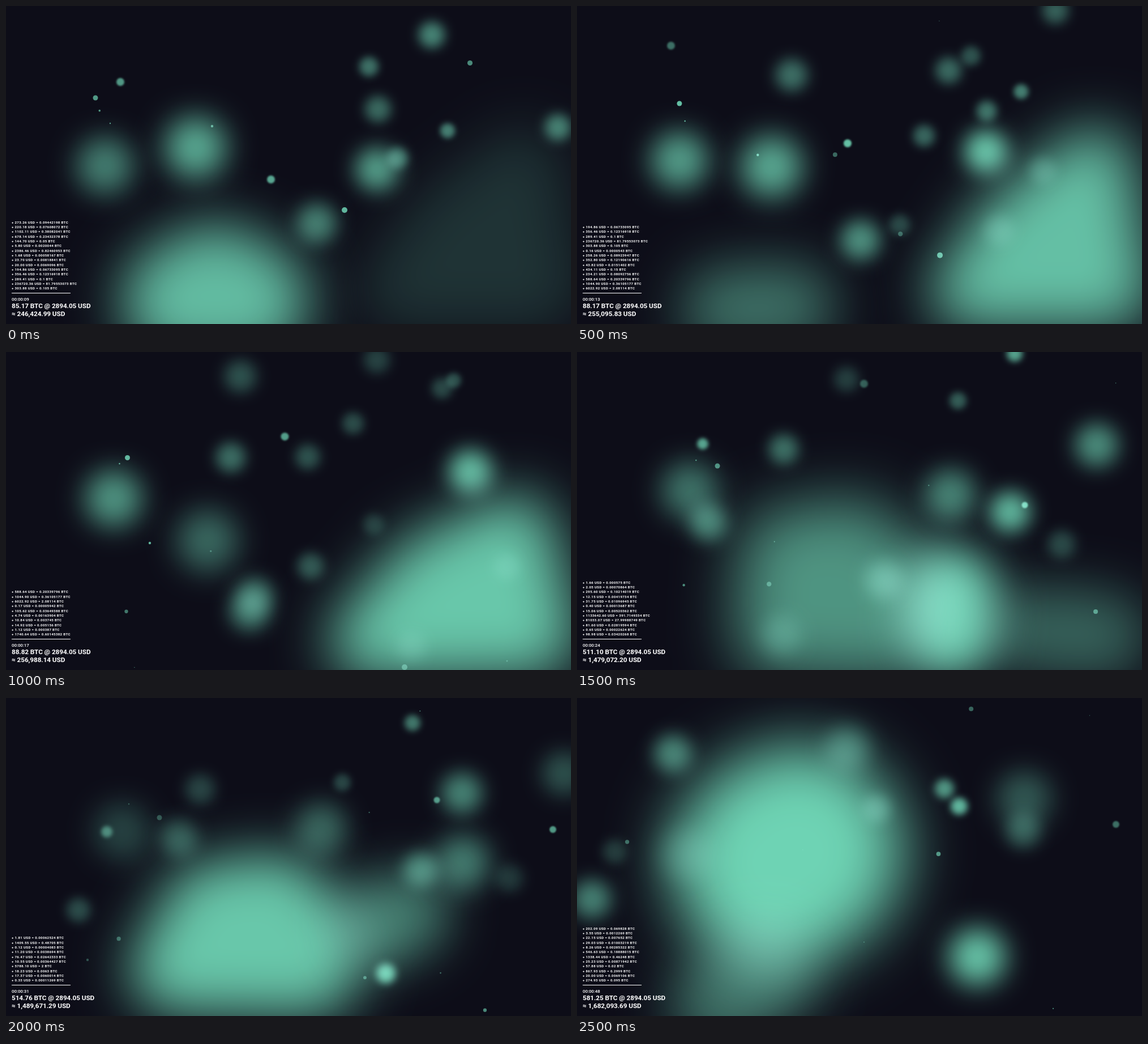
An HTML page with a canvas for the animation above (3000 ms loop, 998 by 561 pixels).

```html
<!DOCTYPE html>
<html lang="en">
<head>
<meta charset="utf-8">
<title>Exchange lights</title>
<style>
  html, body { margin: 0; width: 100%; height: 100%; overflow: hidden; background: #0d0d18; }
  canvas { display: block; width: 998px; height: 561px; }
</style>
</head>
<body>
<canvas id="stage" width="998" height="561"></canvas>
<script>
const W = 998, H = 561, HOLD = 500;
const GLOW = 'rgb(102,209,172)';
const RATE = 2894.05;

// Each scene adds trades to the ledger and lets new lights drift off.
// mass: outline points, rim width, blur, strength
// light: x, y, radius, strength, scenes it lives, total drift
const corner = [[690, 505], [775, 385], [915, 280], [950, 505]];
const scenes = [
  {
    clock: '00:00:09', btc: '85.17', usd: '246,424.99', rows: 15,
    trades: `0.09442198 0.07608072 0.38082041 0.23432378 0.05 0.0020044 0.82460953 0.00058167
      0.00818841 0.0069096 0.06733095 0.12316918 0.1 81.79553073 0.105`,
    masses: [
      { points: [[310, 520], [370, 490], [430, 520]], width: 210, blur: 48, strength: .88 },
      { points: corner, width: 130, blur: 50, strength: .19 }
    ],
    lights: [
      [655, 288, 38, .92, 5, 330, -155], [175, 282, 50, .74, 5, 30, -47],
      [335, 250, 54, .86, 3, 21, 83], [549, 383, 35, .66, 4, -189, 117],
      [468, 306, 7, .9, 4, 39, -250], [598, 360, 5, .9, 3, 106, 196],
      [158, 162, 4.5, .9, 5, 113, 49], [184, 207, 1.2, .9, 5, 33, -20],
      [364, 212, 2.2, .9, 5, -220, 250], [692, 268, 18, .55, 3, 78, -204],
      [657, 182, 23, .5, 3, -2, -168], [752, 51, 23, .6, 2, 93, -43],
      [780, 220, 13, .6, 3, 11, -170], [641, 107, 17, .5, 2, 55, -19],
      [202, 134, 7, .7, 2, -36, -64], [975, 214, 23, .6]
    ]
  },
  {
    clock: '00:00:13', btc: '88.17', usd: '255,095.83', rows: 14,
    trades: `0.0000543 0.08923947 0.12190616 0.0151402 0.15 0.08092756 0.20339796 0.36105177
      2.08114`,
    masses: [
      { points: [[260, 535], [380, 530]], width: 150, blur: 48, strength: .5 },
      { points: corner, width: 130, blur: 50, strength: .9 }
    ],
    lights: [
      [379, 122, 28, .5, 2, 35, -79], [613, 229, 19, .45, 2, 0, -103],
      [570, 386, 18, .3, 2, 79, -82], [745, 395, 26, .3, 2, -29, 125],
      [822, 290, 23, .28, 2, 63, 89]
    ]
  },
  {
    clock: '00:00:17', btc: '88.82', usd: '256,988.14', rows: 10,
    trades: '0.00005942 0.03649388 0.00163904 0.003745 0.005156 0.000387 0.60145382',
    masses: [
      { points: [[640, 510], [745, 390], [900, 320], [940, 505]], width: 135, blur: 50, strength: .94 },
      { points: [[500, 285]], width: 160, blur: 37, strength: .86 }
    ],
    lights: [
      [397, 186, 26, .52, 3, -54, -25], [533, 185, 22, .35, 2, -57, -137],
      [538, 378, 23, .4], [440, 430, 32, .5]
    ]
  },
  {
    clock: '00:00:24', btc: '511.10', usd: '1,479,072.20', rows: 12,
    trades: `0.000575 0.00070864 0.10214019 0.00419734 0.01096945 0.00013687 0.00520362
      391.7149334 27.99988749 0.02819594 0.00022624 0.03420268`,
    masses: [
      { points: [[360, 350], [490, 330], [600, 430], [560, 510], [350, 500]],
        width: 140, blur: 55, strength: .68 },
      { points: [[800, 490], [930, 500]], width: 155, blur: 45, strength: .42 },
      { points: [[662, 430], [662, 490]], width: 165, blur: 38, strength: .95 }
    ],
    lights: [
      [660, 252, 45, .6, 2, -103, -22], [765, 282, 36, .85, 2, 40, -114],
      [232, 301, 32, .55, 2, 73, -54], [791, 270, 5.5, .95, 2, -30, -90],
      [222, 162, 10, .75, 2, -44, 74], [773, 3, 14, .75, 2, -55, 41],
      [673, 86, 15, .4, 2, -79, 63], [856, 339, 24, .3, 2, 34, -21], [542, 402, 33, .5]
    ]
  },
  {
    clock: '00:00:31', btc: '514.76', usd: '1,489,671.29', rows: 10,
    trades: `0.00062524 0.48705 0.00004083 0.0038694 0.02642333 0.00364427 2 0.0063 0.0060014
      0.00011269`,
    masses: [
      { points: [[295, 480], [360, 365], [480, 350], [555, 430], [545, 485]],
        width: 150, blur: 48, strength: .94 },
      { points: [[660, 400], [705, 380]], width: 155, blur: 42, strength: .55 },
      { points: [[800, 490]], width: 160, blur: 38, strength: .35 }
    ],
    lights: [
      [807, 290, 48, .55, 2, -17, -112], [732, 303, 30, .55, 2, 56, -69],
      [671, 486, 17, .95, 2, -22, -326], [128, 374, 21, .32, 2, -62, -103],
      [966, 232, 6, .7, 2, -14, -9]
    ]
  },
  {
    clock: '00:00:48', btc: '581.25', usd: '1,682,093.69', rows: 12,
    trades: `0.069828 0.0012269 0.007652 0.01003219 0.00285322 0.18888015 0.46248 0.00871942
      0.02 0.2999 0.0069106 0.095`,
    masses: [
      { points: [[355, 290], [390, 270]], width: 375, blur: 56, strength: 1 },
      { points: [[255, 540], [330, 490]], width: 180, blur: 46, strength: .48 }
    ],
    lights: [
      [707, 457, 50, 1], [169, 98, 33, .62], [26, 355, 34, .62], [478, 88, 38, .48],
      [675, 191, 15, .9], [190, 275, 45, .32], [530, 195, 24, .4]
    ]
  }
];

// Shared pace of the drift: slow, faster, slow again.
function pace(k) {
  const t = k / 4;
  return (t + t * t * (3 - 2 * t)) / 2;
}

function lightAt(k, born, [x, y, r, strength, life = 1, dx = 0, dy = 0]) {
  const end = born + life - 1;
  const u = life > 1 ? (pace(k) - pace(born)) / (pace(end) - pace(born)) : 0;
  const age = (k - born + 1) / (life + 1);
  const fade = Math.sin(Math.PI * age ** .7);
  return [x + dx * u, y + dy * u, r, strength * fade];
}

function lightsIn(k) {
  const isAlive = (light, born) => k >= born && k < born + (light[4] || 1);
  return scenes.flatMap(({ lights }, born) =>
    lights.filter(light => isAlive(light, born)).map(light => lightAt(k, born, light)));
}

function seeded(seed) {
  return () => {
    const v = Math.sin(seed++ * 12.9898) * 43758.5453;
    return v - Math.floor(v);
  };
}

// Tiny sparks scattered over each scene.
function sparks(k) {
  const random = seeded(100 * k + 7);
  return Array.from({ length: 2 + k }, () =>
    [W * random(), H * random(), .6 + 4 * random() ** 2, .3 + .4 * random()]);
}

function soften(ctx, blur, strength) {
  ctx.filter = blur > .2 ? `blur(${blur}px)` : 'none';
  ctx.globalAlpha = strength;
}

function drawMass(ctx, { points, width, blur, strength }) {
  // Fill and rim are joined on their own layer so their overlap stays even.
  const pad = 200;
  const layer = new OffscreenCanvas(W + 2 * pad, H + 2 * pad);
  const shape = layer.getContext('2d');
  shape.translate(pad, pad);
  shape.fillStyle = shape.strokeStyle = GLOW;
  shape.lineWidth = width;
  shape.lineJoin = shape.lineCap = 'round';
  shape.beginPath();
  shape.moveTo(...points[0]);
  for (const [x, y] of points) shape.lineTo(x, y);
  shape.closePath();
  shape.fill();
  shape.stroke();
  soften(ctx, blur, strength);
  ctx.drawImage(layer, -pad, -pad);
}

function drawLight(ctx, [x, y, r, strength]) {
  soften(ctx, Math.max(0, .53 * (r - 3.6)), strength);
  ctx.beginPath();
  ctx.arc(x, y, r, 0, 2 * Math.PI);
  ctx.fill();
}

function write(ctx, text, y, size, weight, spacing = 0) {
  ctx.font = `${weight} ${size}px Roboto, sans-serif`;
  ctx.letterSpacing = spacing + 'px';
  ctx.fillText(text, 10, y);
}

function drawLedger(ctx, { clock, btc, usd }, trades) {
  ctx.fillStyle = '#fff';
  trades.forEach((amount, i) => {
    const y = 500.2 - (trades.length - 1 - i) * 8.31;
    write(ctx, `+ ${(amount * RATE).toFixed(2)} USD = ${amount} BTC`, y, 6.1, 700, .34);
  });
  ctx.fillRect(10, 506, 104, 1);
  write(ctx, clock, 520.3, 8, 500, -.1);
  write(ctx, `${btc} BTC @ ${RATE} USD`, 533.2, 11.8, 700, -.1);
  write(ctx, `≈ ${usd} USD`, 546.7, 11.8, 700, -.1);
}

const history = [];
const pictures = scenes.map((scene, k) => {
  history.push(...scene.trades.split(/\s+/));
  const picture = new OffscreenCanvas(W, H);
  const ctx = picture.getContext('2d');
  ctx.fillStyle = '#0d0d18';
  ctx.fillRect(0, 0, W, H);
  ctx.save();
  ctx.globalCompositeOperation = 'screen';
  ctx.fillStyle = GLOW;
  scene.masses.forEach(mass => drawMass(ctx, mass));
  [...lightsIn(k), ...sparks(k)].forEach(light => drawLight(ctx, light));
  ctx.restore();
  drawLedger(ctx, scene, history.slice(-scene.rows));
  return picture;
});

const stage = document.getElementById('stage').getContext('2d');
function tick() {
  const k = Math.floor(performance.now() / HOLD) % pictures.length;
  stage.drawImage(pictures[k], 0, 0);
  requestAnimationFrame(tick);
}
tick();
</script>
</body>
</html>
```
